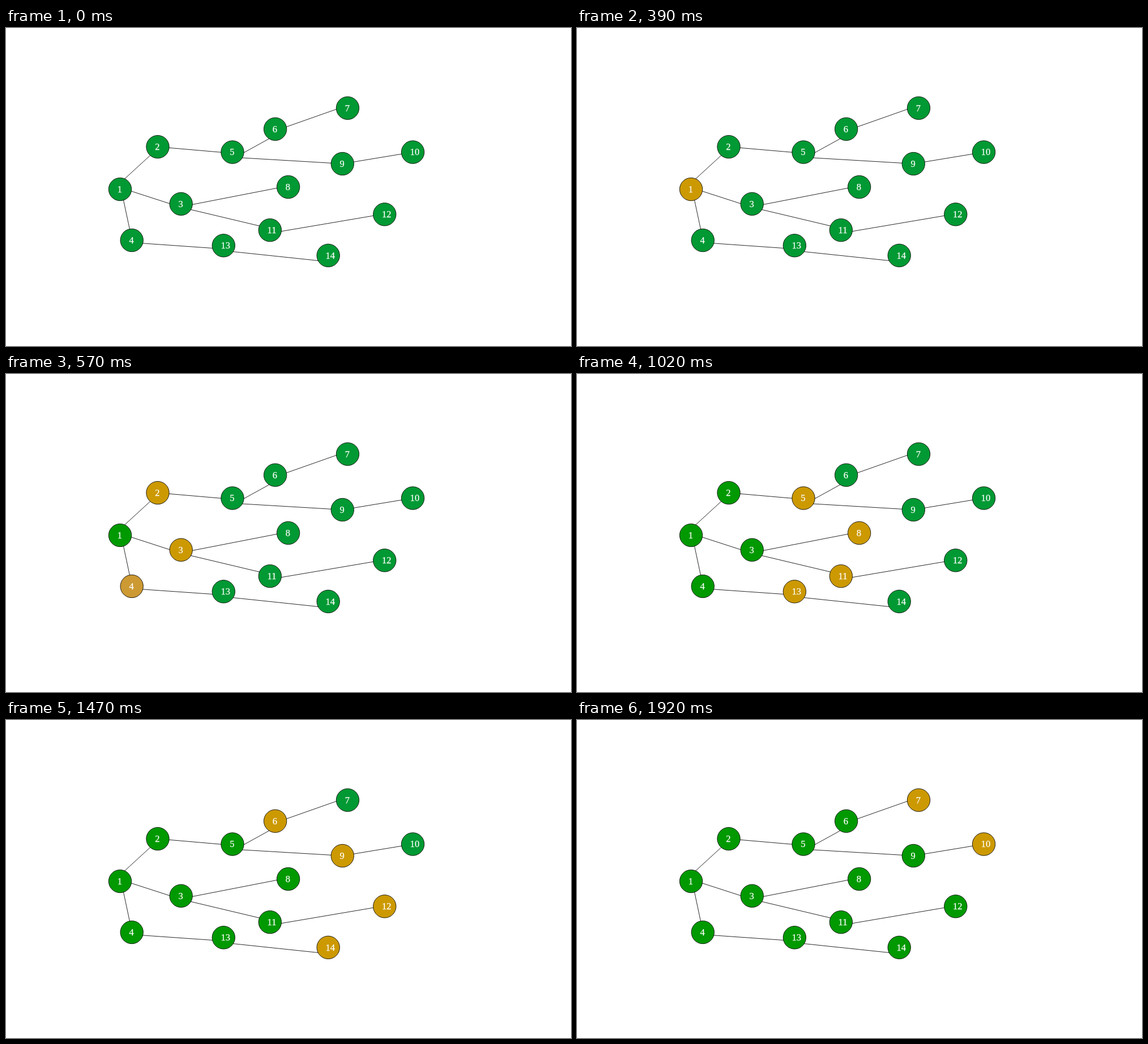
Write an HTML page that moves like this. It is 998 by 561 pixels and loops after 2370 ms.

```html
<!DOCTYPE html>
<html lang="en">
<head>
<meta charset="utf-8">
<title>Breadth-first traversal</title>
<style>
  html, body { margin: 0; width: 100%; height: 100%; overflow: hidden; background: #fff; }
  svg { display: block; width: 100%; height: 100%; }
  line, circle { stroke: #000; stroke-width: .85; }
  text { fill: #fff; stroke: #fff; stroke-width: .25; font: 16.5px "Liberation Serif", Times, serif; }
</style>
</head>
<body>
<svg id="tree" viewBox="0 0 998 561"></svg>
<script>
const LOOP = 2370, FIRST_STEP = 120, STEP = 450, RADIUS = 20.2;
const WAITING = '#009933', ACTIVE = '#cc9900', DONE = '#009900';

const tree = document.getElementById('tree');
const edgeLayer = add(tree, 'g');
const nodes = [];

function add(parent, tag, attributes = {}, content = '') {
  const element = document.createElementNS(tree.namespaceURI, tag);
  for (const name in attributes) element.setAttribute(name, attributes[name]);
  element.textContent = content;
  return parent.appendChild(element);
}

// Edges run under the circles; the shifts move their ends vertically off the centres.
function addNode(x, y, parentLabel, parentShift = 0, ownShift = 0) {
  const parent = nodes[parentLabel - 1];
  if (parent) {
    add(edgeLayer, 'line', {
      x1: parent.x, y1: parent.y + parentShift, x2: x, y2: y + ownShift
    });
  }
  const circle = add(tree, 'circle', { cx: x, cy: y, r: RADIUS });
  nodes.push({ x, y, circle, depth: parent ? parent.depth + 1 : 1, active: ACTIVE });
  add(tree, 'text', { x: x - 4.8, y: y + 5.2 }, nodes.length);
}

addNode(201.5, 284.5);
addNode(268, 209.6, 1, -11, 3);
addNode(309.2, 310.3, 1, -3, 6);
addNode(222.2, 374.5, 1, -9, -2);
addNode(400, 219, 2, 0, 2);
addNode(475.6, 178.3, 5, 12, 11);
addNode(603.5, 141.3, 6, 3, -5);
addNode(498.6, 280.5, 3, 5, -2);
addNode(594.3, 239.5, 5, 9);
addNode(718.6, 219, 9);
addNode(466.3, 356.6, 3, 6, -3);
addNode(668.8, 328.8, 11, 5.5, -1);
addNode(384.3, 383.8, 4, 4, 6);
addNode(569.2, 401.3, 13, 9, 11);
nodes[3].active = '#cc9933';

function draw(time) {
  const level = Math.floor((time - FIRST_STEP) / STEP) + 1;
  for (const { circle, depth, active } of nodes) {
    const fill = depth > level ? WAITING : depth === level ? active : DONE;
    circle.setAttribute('fill', fill);
  }
}

const start = performance.now();
function tick() {
  draw((performance.now() - start) % LOOP);
  requestAnimationFrame(tick);
}
tick();
</script>
</body>
</html>
```
